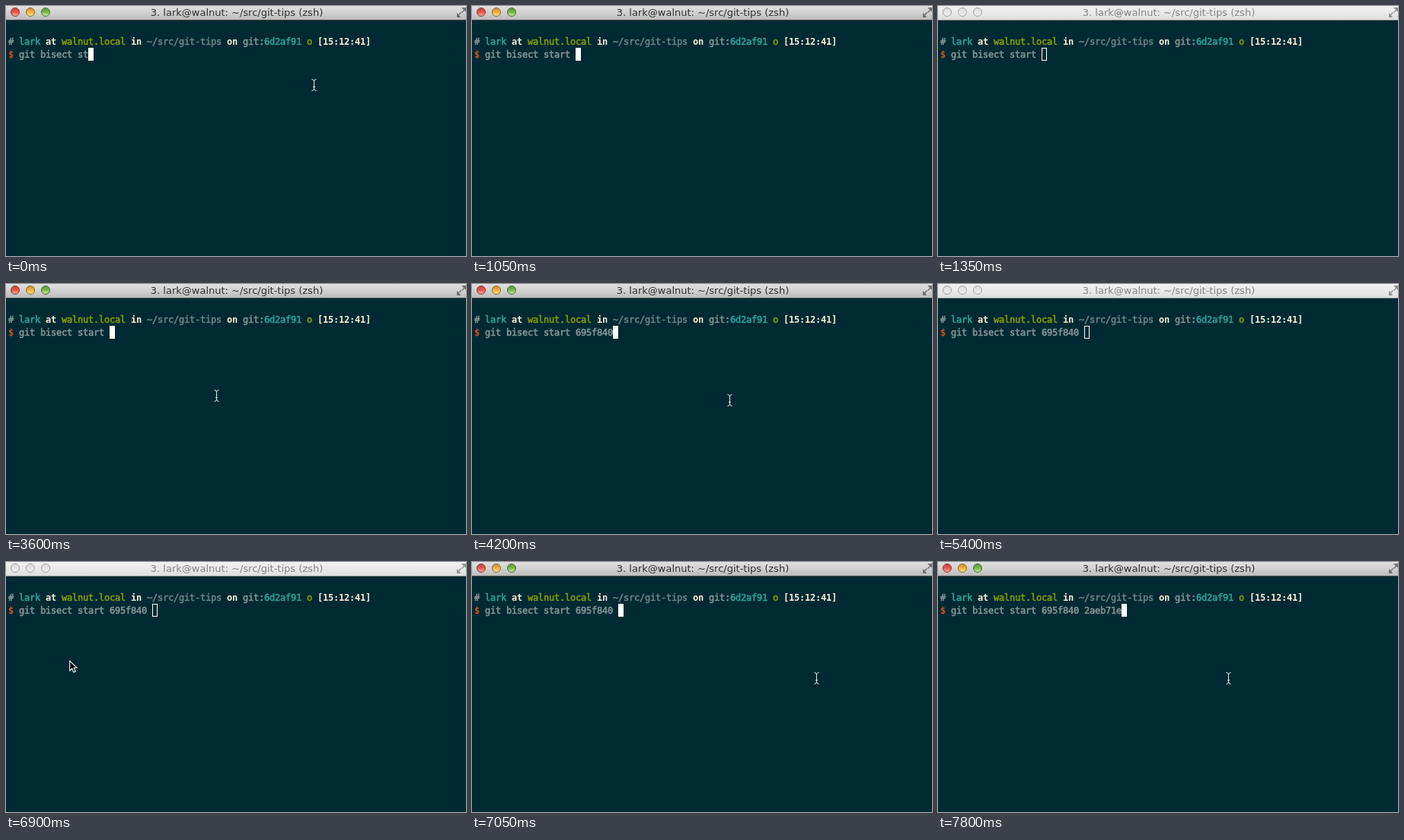
These frames come from a looping animation (604 px wide and 329 px high, 8 s). An HTML page with a canvas:

```html
<!DOCTYPE html>
<html lang="en">
<head>
<meta charset="utf-8">
<title>Terminal</title>
<style>
html, body { margin: 0; width: 100%; height: 100%; overflow: hidden; background: #002a33; }
canvas { display: block; }
</style>
</head>
<body>
<canvas id="stage" width="604" height="329"></canvas>
<script>
const ctx = document.getElementById('stage').getContext('2d');
const LOOP = 8000, CELL = 7, LEFT = 3;
const GRAY = '#839496', CYAN = '#2aa198', GREEN = '#859900', CREAM = '#f5efdc', ORANGE = '#d14f1b';

const PROMPT = [
  ['# ', GRAY], ['lark ', CYAN], ['at ', CREAM, true], ['walnut.local ', GREEN],
  ['in ', CREAM, true], ['~/src/git-tips ', '#6b8087'], ['on ', CREAM, true],
  ['git:', GRAY], ['6d2af91 ', CYAN], ['o ', GREEN], ['[15:12:41]', CREAM, true]
];

// Each track holds [start time, value]; values change in hard steps.
const COMMAND = [
  [0, 'git bisect st'], [150, 'git bisect star'], [300, 'git bisect start'],
  [450, 'git bisect start '], [4050, 'git bisect start 695f840'],
  [5100, 'git bisect start 695f840 '], [7500, 'git bisect start 695f840 2aeb71e']
];
const FOCUS = [[0, true], [1350, false], [3600, true], [5400, false], [7050, true]];
const POINTER = [
  [0, [401, 96, beam]], [900, [395, 96, beam]], [1050, null],
  [3600, [273, 139, beam]], [3900, [341, 151, beam]], [4200, [335, 145, beam]],
  [4350, [322, 145, beam]], [4500, null],
  [6900, [83, 129, arrow]], [7050, [449, 145, beam]], [7200, [456, 151, beam]],
  [7500, [449, 145, beam]], [7650, [420, 145, beam]], [7800, [378, 145, beam]]
];
const at = (track, time) => track.findLast(step => step[0] <= time)[1];

function verticalGradient(y0, y1, ...colors) {
  const gradient = ctx.createLinearGradient(0, y0, 0, y1);
  colors.forEach((color, i) => gradient.addColorStop(i / (colors.length - 1), color));
  return gradient;
}

// Draws text on the character grid and returns the next column.
function write(text, column, baseline, color, bold) {
  ctx.font = `${bold ? 'bold ' : ''}12px "DejaVu Sans Mono", monospace`;
  ctx.textAlign = 'left';
  ctx.fillStyle = ctx.strokeStyle = color;
  ctx.lineWidth = 0.55;
  for (const char of text) {
    const x = LEFT + CELL * column++;
    ctx.fillText(char, x, baseline);
    if (!bold) ctx.strokeText(char, x, baseline);
  }
  return column;
}

function light(x, colors, rim) {
  ctx.beginPath();
  ctx.arc(x, 8, 5.5, 0, 7);
  ctx.fillStyle = verticalGradient(2, 14, ...colors);
  ctx.fill();
  ctx.strokeStyle = rim;
  ctx.lineWidth = 1;
  ctx.stroke();
}

function titleBar(active) {
  ctx.fillStyle = active ? verticalGradient(0, 18, '#e0e0e0', '#d0d0d0', '#bcbcbc')
                         : verticalGradient(0, 18, '#f2f2f2', '#e9e9e9', '#dfdfdf');
  ctx.fillRect(0, 0, 604, 18);
  ctx.fillStyle = active ? '#4a4f50' : '#8f9394';
  ctx.fillRect(0, 18, 604, 1);

  if (active) {
    light(12, ['#b8443d', '#ea564b', '#ffb8ae'], '#8c3a34');
    light(32, ['#c58a2f', '#f2b03c', '#ffeda5'], '#8d682c');
    light(52, ['#5a9036', '#78b84a', '#d6f5ae'], '#4a712f');
  } else {
    for (const x of [12, 32, 52]) light(x, ['#dddddd', '#eeeeee'], '#a2a2a2');
  }

  ctx.font = '13px "DejaVu Sans", sans-serif';
  ctx.textAlign = 'center';
  ctx.fillStyle = active ? '#303030' : '#858585';
  ctx.fillText('3. lark@walnut: ~/src/git-tips (zsh)', 303, 13);

  ctx.fillStyle = active ? '#707070' : '#929292';
  ctx.fill(new Path2D('M598 2h6v6l-2-2-3 3-1-1 3-3zM592 15v-6l2 2 3-3 1 1-3 3 2 3z'));
}

function beam() {
  ctx.strokeStyle = '#e4e8e8';
  ctx.lineWidth = 1;
  ctx.stroke(new Path2D('M.5 .5Q3.5 .5 3.5 3.5Q3.5 .5 6.5 .5M3.5 3V13M.5 15.5Q3.5 15.5 3.5 12.5Q3.5 15.5 6.5 15.5M2 10.5H5'));
}

function arrow() {
  const shape = new Path2D('M.7 1.2V14L3.7 11.2 5.8 16 8.2 15 6.1 10.3H10.2Z');
  ctx.fillStyle = '#000';
  ctx.fill(shape);
  ctx.strokeStyle = '#fff';
  ctx.lineWidth = 1.1;
  ctx.stroke(shape);
}

function draw(time) {
  const active = at(FOCUS, time);
  ctx.fillStyle = '#002a33';
  ctx.fillRect(0, 0, 604, 329);
  titleBar(active);

  let column = 0;
  for (const [text, color, bold] of PROMPT) column = write(text, column, 51, color, bold);

  write('$', 0, 68, ORANGE, true);
  const caret = LEFT + CELL * write(at(COMMAND, time), 2, 68, GRAY);
  if (active) {
    ctx.fillStyle = '#fff';
    ctx.fillRect(caret, 55, 7, 17);
  } else {
    ctx.strokeStyle = '#fff';
    ctx.lineWidth = 1;
    ctx.strokeRect(caret + 0.5, 55.5, 6, 16);
  }

  const pointer = at(POINTER, time);
  if (pointer) {
    const [x, y, paint] = pointer;
    ctx.save();
    ctx.translate(x, y);
    paint();
    ctx.restore();
  }
}

function tick() {
  draw(performance.now() % LOOP);
  requestAnimationFrame(tick);
}
tick();
</script>
</body>
</html>
```
